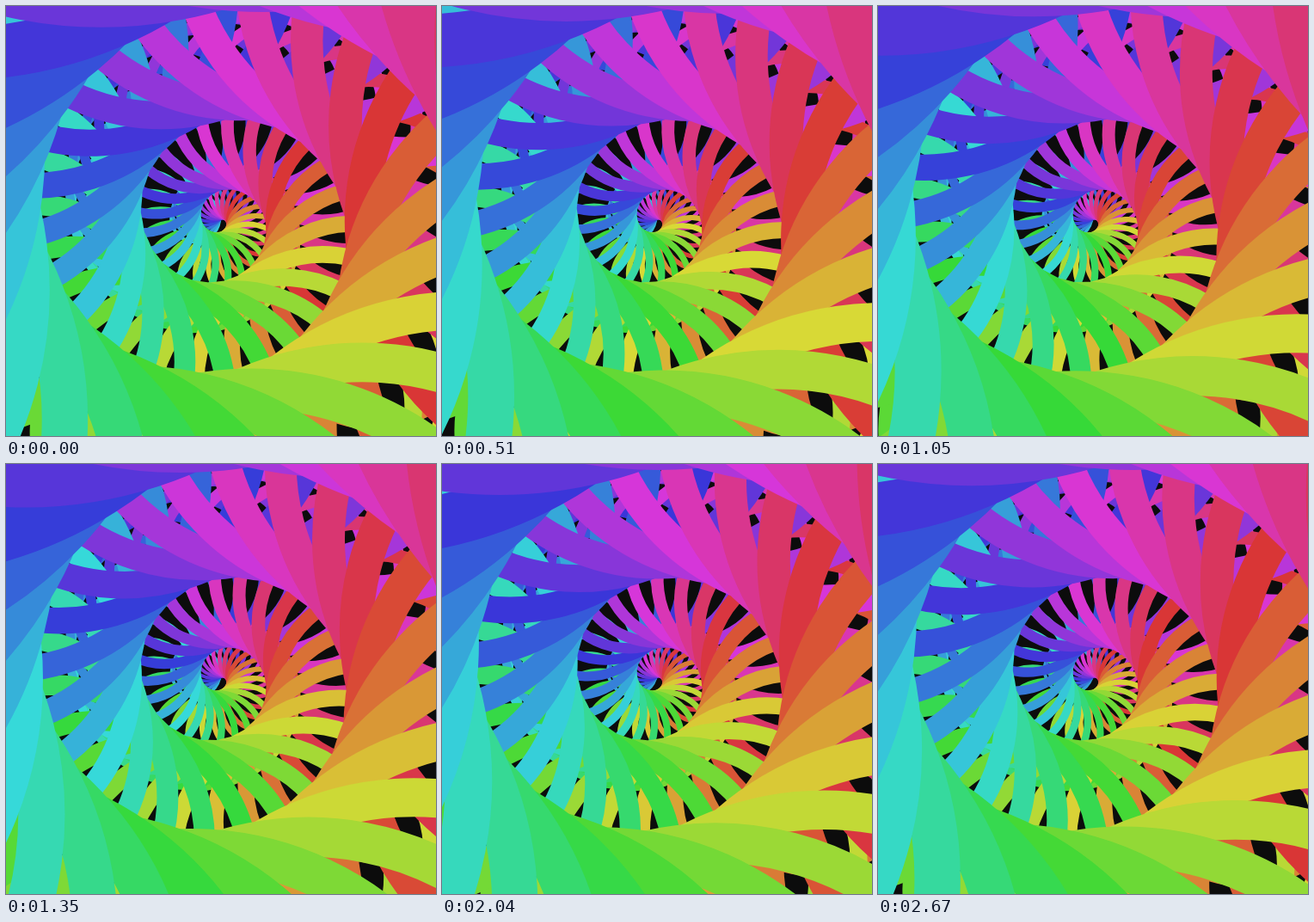
An HTML page without scripts that plays this animation: 500 by 500 pixels, repeating every 2.7 s.

```html
<!DOCTYPE html>
<html lang="en">
<head>
<meta charset="utf-8">
<title>Rainbow ring spiral</title>
<style>
  @property --t { syntax: "<number>"; inherits: true; initial-value: 0; }

  html, body { margin: 0; width: 100%; height: 100%; overflow: hidden; background: #0c0c0c; }

  svg { display: block; width: 100%; height: 100%; animation: advance 2700ms linear infinite; }

  /* Every ring moves on to the place of the next one, so the loop closes. */
  @keyframes advance { from { --t: 0; } to { --t: 1; } }

  /* The gap to the centre grows with the square of the index, the ring size
     with twice that gap, and the hue follows the angle. */
  circle {
    --i: calc(var(--k) + .5 + var(--t));
    --gap: calc(var(--i) * var(--i) * .0368px);
    --size: calc(30px + 2 * var(--gap));
    --angle: calc(180deg + var(--i) * 14.4deg);
    cx: calc(var(--gap) + var(--size));
    cy: 0;
    r: calc(var(--size) * .9375);
    fill: none;
    stroke: hsl(var(--angle) 68% 53.1%);
    stroke-width: calc(var(--size) * .125);
    transform: rotate(var(--angle));
    transform-origin: 0 0;
  }
</style>
</head>
<body>
<svg viewBox="-250 -250 500 500">
  <circle style="--k:0"/><circle style="--k:1"/><circle style="--k:2"/><circle style="--k:3"/>
  <circle style="--k:4"/><circle style="--k:5"/><circle style="--k:6"/><circle style="--k:7"/>
  <circle style="--k:8"/><circle style="--k:9"/><circle style="--k:10"/><circle style="--k:11"/>
  <circle style="--k:12"/><circle style="--k:13"/><circle style="--k:14"/><circle style="--k:15"/>
  <circle style="--k:16"/><circle style="--k:17"/><circle style="--k:18"/><circle style="--k:19"/>
  <circle style="--k:20"/><circle style="--k:21"/><circle style="--k:22"/><circle style="--k:23"/>
  <circle style="--k:24"/><circle style="--k:25"/><circle style="--k:26"/><circle style="--k:27"/>
  <circle style="--k:28"/><circle style="--k:29"/><circle style="--k:30"/><circle style="--k:31"/>
  <circle style="--k:32"/><circle style="--k:33"/><circle style="--k:34"/><circle style="--k:35"/>
  <circle style="--k:36"/><circle style="--k:37"/><circle style="--k:38"/><circle style="--k:39"/>
  <circle style="--k:40"/><circle style="--k:41"/><circle style="--k:42"/><circle style="--k:43"/>
  <circle style="--k:44"/><circle style="--k:45"/><circle style="--k:46"/><circle style="--k:47"/>
  <circle style="--k:48"/><circle style="--k:49"/><circle style="--k:50"/><circle style="--k:51"/>
  <circle style="--k:52"/><circle style="--k:53"/><circle style="--k:54"/><circle style="--k:55"/>
  <circle style="--k:56"/><circle style="--k:57"/><circle style="--k:58"/><circle style="--k:59"/>
  <circle style="--k:60"/><circle style="--k:61"/><circle style="--k:62"/><circle style="--k:63"/>
  <circle style="--k:64"/><circle style="--k:65"/><circle style="--k:66"/><circle style="--k:67"/>
  <circle style="--k:68"/><circle style="--k:69"/><circle style="--k:70"/><circle style="--k:71"/>
  <circle style="--k:72"/><circle style="--k:73"/><circle style="--k:74"/><circle style="--k:75"/>
  <circle style="--k:76"/><circle style="--k:77"/><circle style="--k:78"/><circle style="--k:79"/>
  <circle style="--k:80"/><circle style="--k:81"/><circle style="--k:82"/><circle style="--k:83"/>
  <circle style="--k:84"/><circle style="--k:85"/><circle style="--k:86"/>
</svg>
</body>
</html>
```
